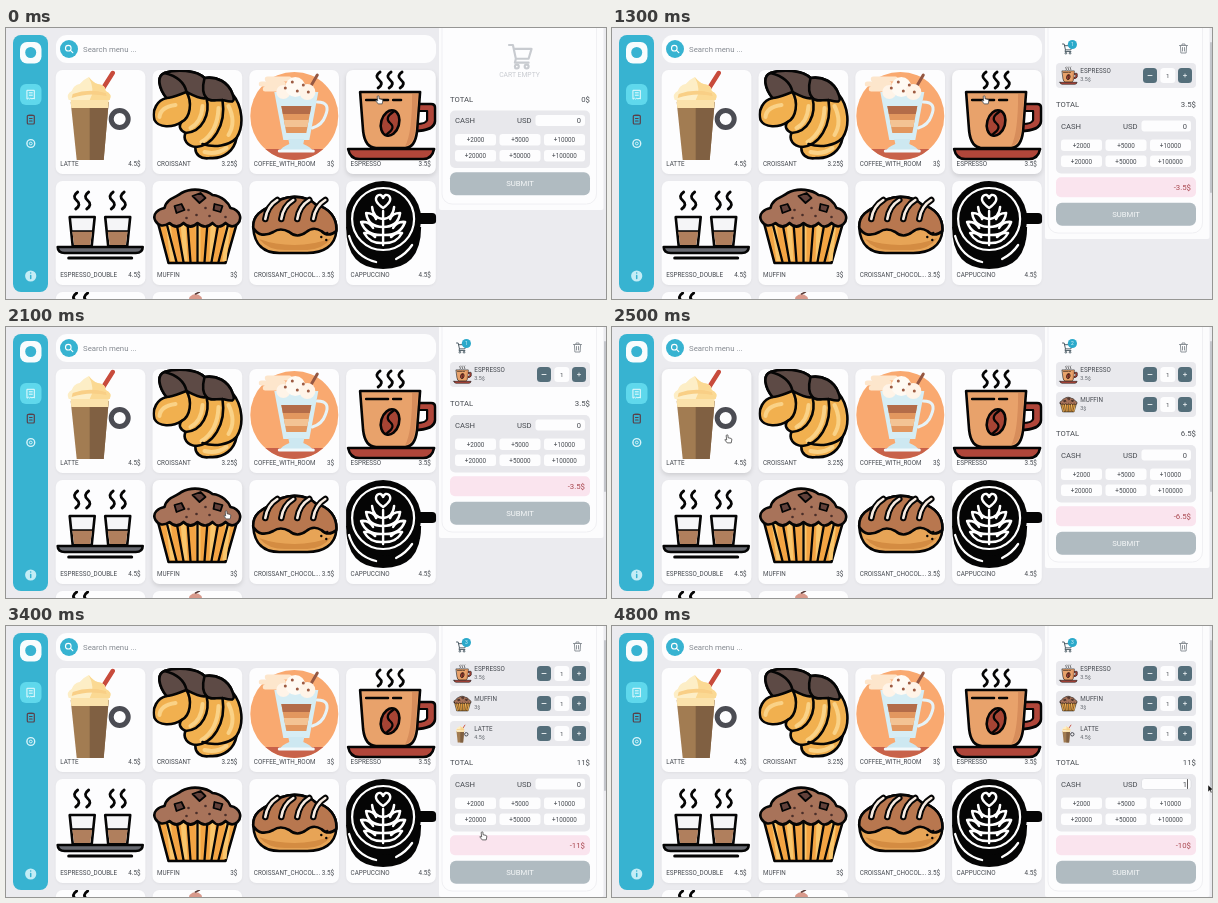
These frames come from a looping animation (600x271 px, 5000 ms). An HTML page:

```html
<!DOCTYPE html>
<html lang="en">
<head>
<meta charset="utf-8">
<title>Cafe point of sale</title>
<style>
html, body { margin: 0; width: 100%; height: 100%; overflow: hidden; background: #ebebef; }
svg { display: block; width: 600px; height: 271px; font-family: Roboto, Arial, sans-serif; }
.card { filter: drop-shadow(0 1px 1px #0000000c); }
.card.hover { filter: drop-shadow(0 2px 2px #00000020); }
</style>
</head>
<body>
<svg id="stage" viewBox="0 0 600 271"></svg>
<script>
const TEAL = '#37b3d1', SLATE = '#546e7a', INK = '#474b51', BLACK = '#050505';

const rect = (x, y, w, h, r, fill, extra = '') =>
  `<rect x="${x}" y="${y}" width="${w}" height="${h}" rx="${r}" fill="${fill}" ${extra}/>`;
const circle = (x, y, r, fill, stroke = 'none', width = 1) =>
  `<circle cx="${x}" cy="${y}" r="${r}" fill="${fill}" stroke="${stroke}" stroke-width="${width}"/>`;
const path = (d, fill = 'none', stroke = 'none', width = 1) =>
  `<path d="${d}" fill="${fill}" stroke="${stroke}" stroke-width="${width}" stroke-linecap="round" stroke-linejoin="round"/>`;
const outlined = (d, fill = 'none', width = 2.6) => path(d, fill, BLACK, width);
const group = (x, y, body, scale = 1) =>
  `<g transform="translate(${x} ${y}) scale(${scale})">${body}</g>`;
// y is the vertical centre of the capitals
const text = (x, y, s, size = 7.7, anchor = 'start', fill = INK) =>
  `<text x="${x}" y="${y + size * .355}" font-size="${size}" text-anchor="${anchor}" fill="${fill}">${s}</text>`;
const steam = (x, y, h) =>
  outlined(`M${x + 1} ${y}q-6 ${h * .25} -1 ${h / 2}t-1 ${h / 2}`, 'none', 2.8);
const mirrored = (axis, body) =>
  body + `<g transform="translate(${axis * 2}) scale(-1 1)">${body}</g>`;

// Illustrations, each in a 90 x 90 box
const shotGlass = x =>
  outlined(`M${x} 36h25l-3 29h-19z`, '#f5f5f7') +
  path(`M${x + 2.5} 50h20l-2 14h-16z`, '#b07f5d') +
  outlined(`M${x + 2} 50h21`, 'none', 1.5) + steam(x + 7, 11, 17) + steam(x + 18, 11, 17);

const art = {
  latte:
    path('M45 22L57 3', 'none', '#c84b3c', 4.5) +
    circle(64, 49, 8.5, 'none', '#4b4c53', 5) +
    path('M15 32H53L48 90H21Z', '#a27c52') + path('M34 32H53L48 90H34Z', '#806042') +
    path('M15 30H53L52.5 38H15.5Z', '#fbe2ab') +
    path('M13 30Q10 24 16 21Q18 15 24 14Q27 10 33 7Q38 13 42 14Q50 15 50 21Q57 24 54 30Z', '#fdeec6') +
    path('M33 7Q38 13 42 14Q50 15 50 21Q57 24 54 30H34Q40 20 33 7Z', '#fbd993') +
    path('M17 24Q33 18 50 23L51 26Q33 22 16 28Z', '#f9cf86'),

  croissant:
    outlined('M2 50C-1 40 5 30 14 28C6 18 4 6 12 3C24-1 44 0 52 8C64 6 76 12 80 24C90 36 92 56 84 68C82 80 72 89 58 88C48 90 42 84 43 77C35 76 30 70 33 63C27 60 26 56 29 52C20 58 6 58 2 50Z', '#f1b04f') +
    path('M7 47Q8 37 23 35M38 58Q49 52 50 36M49 72Q65 62 66 38M52 82Q64 85 74 78M76 36Q84 52 76 65', 'none', '#fad287', 4) +
    outlined('M14 28C6 18 4 6 12 3C24-1 44 0 52 8C64 6 76 12 80 24C84 34 78 32 70 30C62 30 58 32 54 28C48 30 38 24 34 22C28 24 20 28 14 28Z', '#5d4a45') +
    outlined('M29 52C38 48 40 32 34 22M33 63C50 62 58 44 54 28M43 77C60 76 74 56 70 30M50 74C62 78 76 76 84 68M12 3C24 6 32 12 34 22M52 8C50 16 50 24 54 28'),

  room:
    circle(45, 46, 44, '#f9a970') +
    path('M16 79H74Q62 90 45 90T16 79Z', '#c8624a') +
    path('M12 14h22M18 9h22M16 19h20', 'none', '#fde6cc', 5) +
    path('M58 22L68 5', 'none', '#955742', 3) +
    path('M68 32Q82 32 76 46Q73 55 63 58', 'none', '#e6f3f8', 3) +
    path('M25 22H69L60 70H34Z', '#d6edf4') +
    path('M32 36H62L57 63H37Z', '#e2975f') + path('M32 36H62L60.5 44H33.5Z', '#b36c49') +
    path('M34.5 50H59.5L58 57H36Z', '#f3c394') +
    circle(34, 22, 7, '#fff4e8') + circle(46, 17, 10, '#fffaf3') + circle(58, 22, 8, '#fff4e8') +
    [[36, 18], [43, 12], [48, 21], [54, 15], [59, 22]].map(([x, y]) => circle(x, y, 1.5, '#9c5a41')).join('') +
    path('M39 69H55L54 74Q62 77 64 82H30Q32 77 40 74Z', '#cde8f1') +
    path('M30 81H64', 'none', '#f2f9fb', 3),

  espresso:
    steam(33, 2, 16) + steam(44, 2, 16) + steam(55, 2, 16) +
    outlined('M71 34H85Q89 34 89 38V51Q88 61 68 61', '#b0463a') +
    outlined('M72 41H81V50Q80 54 70 54', '#fff', 2.2) +
    outlined('M14 22H74L71 61Q69 78 59 78H30Q19 78 17 61Z', '#e8a26b') +
    path('M66 24H72L69 62Q67 75 59 76Q66 64 66 24Z', '#d78d5b') +
    outlined('M20 30H42M47 30H55', 'none', 2.4) +
    `<g transform="rotate(16 44 53)"><ellipse cx="44" cy="53" rx="9" ry="13" fill="#a74434" stroke="${BLACK}" stroke-width="2.6"/></g>` +
    outlined('M47 42Q38 48 44 53T41 64', 'none', 2.2) +
    outlined('M2 79H88Q86 89 77 89H13Q4 89 2 79Z', '#b0463a'),

  double:
    shotGlass(14) + shotGlass(49.5) +
    outlined('M2 66H87Q87 72 80 72H9Q2 72 2 66Z', '#686a71') +
    outlined('M13 77H76', 'none', 3),

  muffin:
    outlined('M5 40L16 82H73L85 40Z', '#f3a443') +
    [0, 1, 2, 3, 4].map(i => path(`M${13 + i * 15} 41h5l${4 - i * 2} 39h-4z`, '#f9c66c')).join('') +
    outlined('M14 42L24 81M24 42L31 81M35 42L38 81M45 42V81M55 42L52 81M66 42L59 81M76 42L66 81', 'none', 2.3) +
    outlined('M3 40C-1 33 6 28 12 27C14 17 25 16 29 12C40 6 54 9 60 14C70 15 76 22 78 27C88 29 90 38 85 43Q79 48 73 42Q66 49 60 42Q53 49 45 42Q38 49 31 42Q24 49 17 42Q8 48 3 40Z', '#a8735a') +
    outlined('M40 15l8-3 5 5-6 5zM22 25l7-2 3 6-8 3zM62 23l8 2-2 6-7-2z', '#62413a', 1.8) +
    [[36, 29], [44, 34], [53, 27], [57, 35], [34, 37], [73, 36]].map(([x, y]) => circle(x, y, 1.3, '#4a2e29')).join(''),

  bun:
    outlined('M4 47C3 34 13 29 22 25C34 13 56 13 67 24C80 27 88 37 87 50C86 65 74 72 58 72H30C14 72 5 63 4 47Z', '#e7a456') +
    path('M10 58Q18 69 36 69H58Q74 68 82 57Q65 64 45 64T10 58Z', '#d48c42') +
    outlined('M4 47C3 34 13 29 22 25C34 13 56 13 67 24C80 27 88 37 87 50Q79 57 72 50Q64 45 57 51Q48 58 40 51Q31 46 24 51Q11 58 4 47Z', '#b8774f') +
    [16, 32, 48, 64].map(x => outlined(`M${x} 38Q${x + 2} 25 ${x + 12} 19`, 'none', 6.5) +
      path(`M${x} 38Q${x + 2} 25 ${x + 12} 19`, 'none', '#f7ece2', 2.6)).join('') +
    [[72, 56], [78, 52], [77, 59]].map(([x, y]) => circle(x, y, 1.2, BLACK)).join(''),

  cappuccino:
    path('M68 32H86Q90 32 90 36V40Q90 43 86 43H68Z', BLACK) +
    path('M0 46H75Q75 88 37 88Q0 88 0 46Z', BLACK) +
    circle(37, 38, 38, BLACK) +
    path('M3 55Q9 76 30 81M66 64Q60 73 50 78', 'none', '#fff', 2.3) +
    circle(37, 38, 31, 'none', '#fff', 2.2) +
    path('M37 64V30M37 27Q27 20 31 15Q35 12 37 17Q39 12 43 15Q47 20 37 27Z', 'none', '#fff', 2.4) +
    mirrored(37, path('M37 38Q27 37 26 26M37 46Q22 46 20 32Q28 32 30 38M37 54Q20 55 15 41Q23 40 27 47M37 62Q24 63 18 52Q24 51 29 56', 'none', '#fff', 2.5)),

  steamCup: steam(20, 1, 16) + steam(31, 1, 16),
  dessert: path('M37 5Q43-1 49 5L50 9H36Z', '#d99a8c') + path('M43 2L47 0', 'none', '#5a3c38', 1.5)
};

const menu = [
  ['latte', 'LATTE', 4.5], ['croissant', 'CROISSANT', 3.25],
  ['room', 'COFFEE_WITH_ROOM', 3], ['espresso', 'ESPRESSO', 3.5],
  ['double', 'ESPRESSO_DOUBLE', 4.5], ['muffin', 'MUFFIN', 3],
  ['bun', 'CROISSANT_CHOCOL...', 3.5], ['cappuccino', 'CAPPUCCINO', 4.5],
  ['steamCup', '', ''], ['dessert', '', '']
].map(([id, name, price], i) =>
  ({ id, name, price, x: 49.7 + i % 4 * 96.8, y: 42 + Math.floor(i / 4) * 111 }));

const card = ({ id, name, price, x, y }) => group(x, y,
  `<g class="card" id="${id}">${rect(0, 0, 89.7, 104, 7, '#fdfdfe')}</g>` +
  `<g clip-path="url(#cardClip)">${art[id]}</g>` +
  text(4.5, 93.8, name, 6.3) + (price && text(84.8, 93.8, price + '$', 6.3, 'end')));

const sidebar =
  rect(7, 7, 35, 257, 8, TEAL) +
  rect(14, 14, 21.5, 21.5, 7, '#f8fcfd') + circle(24.7, 24.5, 5.5, TEAL) +
  rect(14, 56, 21.5, 21, 6, '#5fd8ec') +
  path('M21.3 62.3h7v8.7l-1.2-.8-1.1.8-1.2-.8-1.2.8-1.1-.8-1.2.8zM23.3 64.8h3M23.3 67.2h3', 'none', '#e9fbfe', 1) +
  rect(21.3, 87.3, 7, 8.7, 1, 'none', 'stroke="#5a4049" stroke-width="1.2"') +
  path('M23.3 87.3h3M23.5 90.5h2.6M23.5 93h2.6', 'none', '#5a4049', 1.1) +
  circle(24.8, 115.5, 3.9, 'none', '#d9f4fa', 1.4) + circle(24.8, 115.5, 1.4, 'none', '#d9f4fa', 1) +
  circle(24.7, 248, 5.6, '#c4edf6') + path('M24.7 247.5v3M24.7 245v.1', 'none', TEAL, 1.5);

const search =
  rect(50, 7, 380, 28, 11, '#fdfdfe') + circle(63, 21, 9, TEAL) +
  circle(62.3, 20.2, 2.8, 'none', '#fff', 1.1) + path('M64.5 22.4l2.3 2.3', 'none', '#fff', 1.2) +
  text(77, 21.2, 'Search menu ...', 7.8, 'start', '#858a91');

const trolley = (color, width) =>
  path('M0 0h4l3 14h13l3-10H5M7 14l-1 4h14', 'none', color, width) +
  circle(8, 22, 2, 'none', color, width) + circle(18, 22, 2, 'none', color, width);

function cartRow({ id, name, price }, i) {
  const y = 35 + i * 30;
  return rect(444, y, 140, 25, 4, '#e9e9ed') + group(447.5, y + 3.5, art[id], .2) +
    text(468.3, y + 8, name, 6.3) + text(468.3, y + 15.7, price + '$', 5.4, 'start', '#5d6269') +
    rect(531, y + 5, 14, 15, 3.5, SLATE) + path(`M536 ${y + 12.5}h4`, 'none', '#dfe6e9', 1) +
    rect(548.3, y + 5, 15, 15, 3.5, '#fdfdfe') + text(555.8, y + 12.5, '1', 6.2, 'middle') +
    rect(566, y + 5, 14, 15, 3.5, SLATE) +
    path(`M571.5 ${y + 12.5}h3m-1.5-1.5v3`, 'none', '#dfe6e9', .9);
}

function cashBlock(top, cash, focused) {
  const bills = [2000, 5000, 10000, 20000, 50000, 100000].map((value, i) => {
    const x = 449 + i % 3 * 44.5, y = top + (i < 3 ? 23.5 : 39.5);
    return rect(x, y, 41, 11.5, 3, '#fdfdfe') + text(x + 20.5, y + 5.8, '+' + value, 6.3, 'middle');
  }).join('');
  const caretX = cash ? 575.5 : 570.5;
  return rect(444, top, 140, 57.5, 5, '#e8e8ec') +
    text(449, top + 9.8, 'CASH') + text(511, top + 9.8, 'USD') +
    rect(529.5, top + 4.5, 49.5, 11, 3, '#fdfdfe', focused ? 'stroke="#d3d5da" stroke-width=".6"' : '') +
    text(575, top + 10, cash, 7.5, 'end') +
    (focused ? path(`M${caretX} ${top + 5.5}v9`, 'none', '#333', .8) : '') + bills;
}

function cart(items, cash, focused) {
  const n = items.length, total = items.reduce((sum, item) => sum + item.price, 0);
  const top = n ? 58 + n * 30 : 82.5;
  const bottom = n ? 181 + n * 30 : 182;
  const submitY = top + (n ? 86.7 : 61.7);
  const header = n
    ? group(450.5, 16, trolley('#43545e', 2.2), .42) + circle(460.4, 16.5, 4.6, '#2ba9ca') +
      text(460.4, 16.5, n, 5, 'middle', '#d9f5fb') +
      path('M567.5 17.5h8M570 17.5v-1.5h3v1.5M568.4 17.5l.5 7.5h5.2l.5-7.5M570.5 19.5v3.5M572.5 19.5v3.5', 'none', '#83898f', .9)
    : group(503, 17, trolley('#c8cbd0', 2.2), .98) + text(513.5, 47, 'CART EMPTY', 6.8, 'middle', '#c8cbd0');
  return rect(433, -8, 164.5, bottom + 8, 2, '#fcfcfd') +
    rect(436, -12, 154.5, bottom + 6, 10, '#fdfdfe', 'stroke="#f0f0f3" stroke-width="1"') +
    header + items.map(cartRow).join('') +
    text(444, top - 11.5, 'TOTAL') + text(584, top - 11.5, total + '$', 7.8, 'end') +
    cashBlock(top, cash, focused) +
    (n ? rect(444, top + 61.3, 140, 20, 5, '#fae4ee') +
      text(579, top + 71.2, cash - total + '$', 7.8, 'end', '#a9474f') +
      rect(598, 14, 2, 151, 1, '#c3c5ca') : '') +
    rect(444, submitY, 140, 23, 6, '#b0bbc1') +
    text(514, submitY + 11.3, 'SUBMIT', 7.7, 'middle', '#f6f8f9');
}

const pointers = {
  hand: path('M-1.6-3.8q.9-.8 1.6 0v2.5l3 .7q1 .3.8 1.5l-.6 3h-4l-2.4-3q0-1.2 1.6-.2z', '#fff', '#444', .8),
  beam: path('M-1.5-4q1.5 0 1.5 1q0-1 1.5-1M0-3v6M-1.5 4q1.5 0 1.5-1q0 1 1.5 1', 'none', '#333', .8),
  arrow: path('M-1-2v7l1.7-1.6 1.2 2.6 1.2-.6-1.2-2.5h2.3z', '#111', '#fff', .5)
};

// time, x, y of the pointer
const route = [
  [0, 373, 72], [1500, 373, 72], [2000, 221, 188], [2200, 221, 188], [2500, 116, 112],
  [3000, 116, 112], [3400, 477, 210], [3700, 500, 192], [4100, 554, 160],
  [4400, 554, 160], [4800, 597, 161], [5000, 597, 161]
];

function pointerAt(t) {
  const i = route.findIndex(key => key[0] > t);
  const [t0, x0, y0] = route[i - 1], [t1, x1, y1] = route[i];
  const k = (t - t0) / (t1 - t0), ease = k * k * (3 - 2 * k);
  return [x0 + (x1 - x0) * ease, y0 + (y1 - y0) * ease];
}

const orders = [[1200, 'espresso'], [2200, 'muffin'], [2700, 'latte']];
const FOCUS = 4100, TYPE = 4500, LOOP = 5000, STEP = 100;

const stage = document.getElementById('stage');
stage.innerHTML =
  `<defs><clipPath id="cardClip">${rect(0, 0, 90.5, 104, 7, '#000')}</clipPath></defs>` +
  rect(0, 0, 600, 271, 0, '#ebebef') + sidebar + search + menu.map(card).join('') +
  '<g id="cart"></g><g id="pointer"></g>';
const cartLayer = document.getElementById('cart');
const pointerLayer = document.getElementById('pointer');

function render(t) {
  const [x, y] = pointerAt(t);
  const items = orders.filter(([at]) => t >= at).map(([, id]) => menu.find(item => item.id === id));
  for (const item of menu) {
    const over = x > item.x && x < item.x + 90 && y > item.y && y < item.y + 104;
    document.getElementById(item.id).classList.toggle('hover', over);
  }
  cartLayer.innerHTML = cart(items, t >= TYPE ? 1 : 0, t >= FOCUS);
  const kind = x > 582 ? 'arrow' : t >= FOCUS ? 'beam' : 'hand';
  pointerLayer.innerHTML = group(x, y, pointers[kind]);
}

let shown = -1;
function tick() {
  const t = Math.floor(performance.now() % LOOP / STEP) * STEP;
  if (t !== shown) render(shown = t);
  requestAnimationFrame(tick);
}
tick();
</script>
</body>
</html>
```
